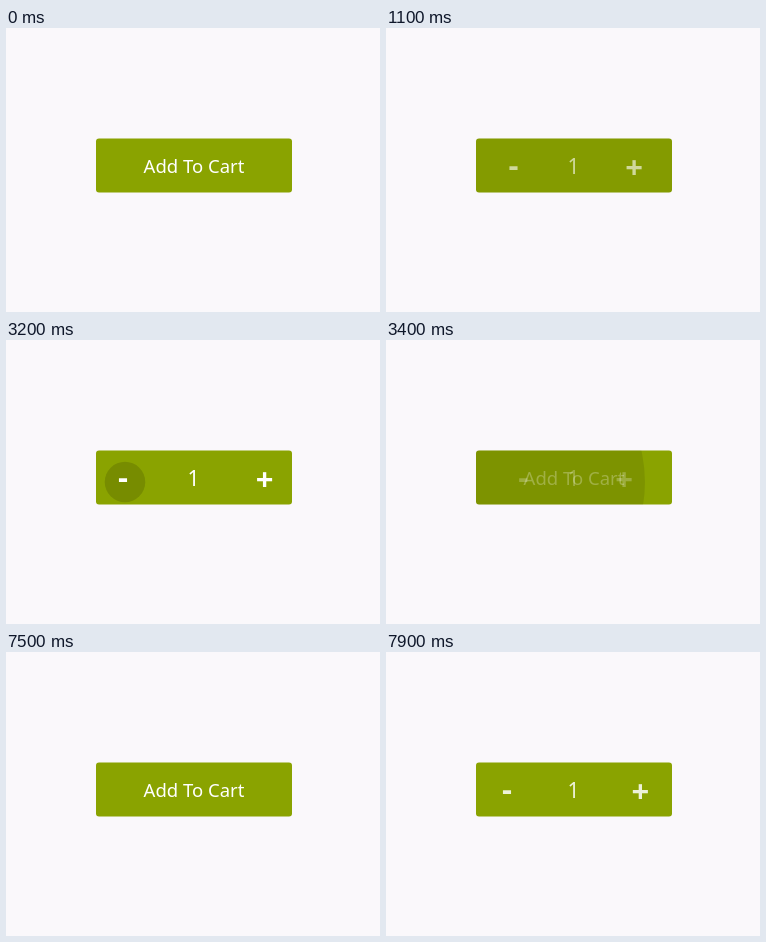
Animation, 374 px wide and 284 px high, one loop 8 s. Source, as an HTML page:

```html
<!DOCTYPE html>
<html lang="en">
<head>
<meta charset="utf-8">
<title>Add to cart button</title>
<style>
  html, body { margin: 0; width: 100%; height: 100%; overflow: hidden; background: #faf8fb; }
  svg { display: block; width: 100vw; height: 100vh; }
  text { font-family: "Noto Sans", "Open Sans", sans-serif; fill: #fff; text-anchor: middle; }
  .label { font-size: 18.5px; }
  .count { font-size: 21px; }
  .sign { font-size: 31px; font-weight: 700; }
</style>
</head>
<body>
<svg viewBox="0 0 374 284">
  <defs>
    <clipPath id="shape"><rect x="90" y="110.5" width="196" height="54" rx="3"/></clipPath>
  </defs>
  <rect x="90" y="110.5" width="196" height="54" rx="3" fill="#8aa300"/>
  <g clip-path="url(#shape)">
    <circle id="ripple" r="0" fill="#000"/>
  </g>
  <text id="label" class="label" x="188" y="144.5">Add To Cart</text>
  <g id="stepper">
    <text id="minus" class="sign" x="117" y="148">-</text>
    <text class="count" x="187.5" y="146">1</text>
    <text id="plus" class="sign" x="258.5" y="150">+</text>
  </g>
</svg>
<script>
  const LOOP = 8000;
  const SLIDE = 27;
  // Each press starts a ripple and swaps the label and the stepper.
  const presses = [
    { at: 785, x: 191, y: 138, opens: true },
    { at: 3175, x: 119, y: 142, opens: false },
    { at: 7500, x: 191, y: 138, opens: true }
  ];

  const el = id => document.getElementById(id);
  const ripple = el("ripple"), label = el("label"), stepper = el("stepper");
  const minus = el("minus"), plus = el("plus");

  const span = (t, from, to) => Math.min(1, Math.max(0, (t - from) / (to - from)));
  const easeOut = p => 1 - (1 - p) * (1 - p);

  function setContent(labelShown, stepperShown) {
    label.setAttribute("opacity", labelShown);
    stepper.setAttribute("opacity", stepperShown);
    const shift = SLIDE * (1 - stepperShown);
    minus.setAttribute("transform", `translate(${shift})`);
    plus.setAttribute("transform", `translate(${-shift})`);
  }

  function setRipple(press, t) {
    ripple.setAttribute("cx", press.x);
    ripple.setAttribute("cy", press.y);
    ripple.setAttribute("r", 200 * easeOut(span(t, 0, 500)));
    ripple.setAttribute("opacity", 0.14 * (1 - span(t, 150, 400)));
  }

  function render(time) {
    const press = presses.filter(p => p.at <= time).pop();
    if (!press) {
      setContent(1, 0);
      ripple.setAttribute("opacity", 0);
      return;
    }
    const t = time - press.at;
    setRipple(press, t);
    if (press.opens) {
      setContent(1 - span(t, 85, 300), easeOut(span(t, 180, 540)));
    } else {
      setContent(easeOut(span(t, 180, 500)), 1 - span(t, 60, 280));
    }
  }

  const start = performance.now();
  function tick() {
    render((performance.now() - start) % LOOP);
    requestAnimationFrame(tick);
  }
  tick();
</script>
</body>
</html>
```
